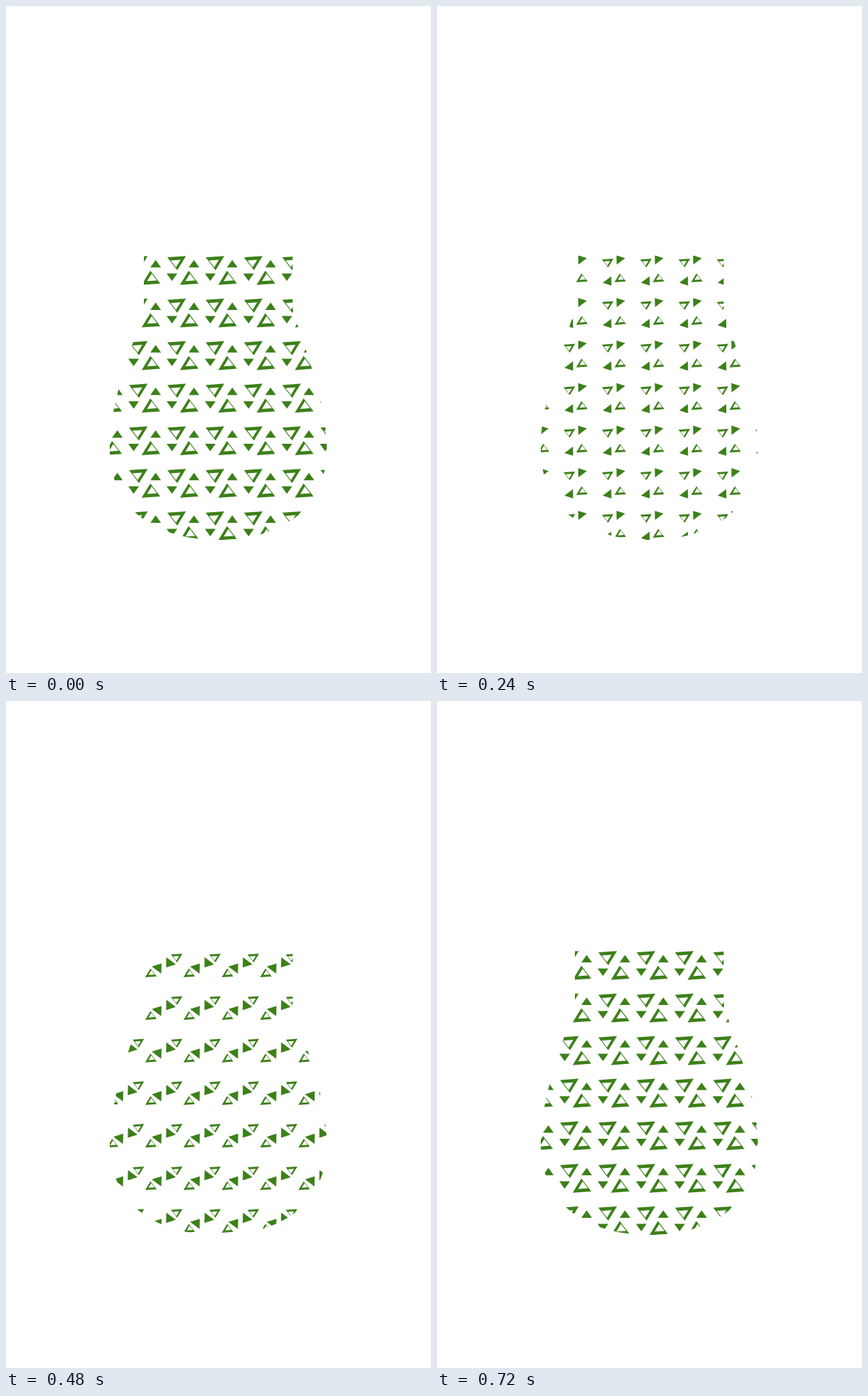
An HTML page with a canvas that plays this animation: 598 px wide and 937 px high, repeating every 750 ms.

```html
<!DOCTYPE html>
<html lang="en">
<head>
<meta charset="utf-8">
<title>Triangle pattern</title>
<style>
  html, body { margin: 0; width: 100%; height: 100%; overflow: hidden; background: #fff; }
  canvas { display: block; }
</style>
</head>
<body>
<canvas id="stage" width="598" height="937"></canvas>
<script>
const canvas = document.getElementById('stage');
const ctx = canvas.getContext('2d');
const LOOP = 750, STEP = 30, STEPS = 24;
const GREEN = '#3c8019';
const AXIS = 298.7;
const TILE = { x: 249, y: 371.5, w: 53.9, h: 59.8 };

// Straight neck, flared shoulder, round belly; the right half mirrors the left.
function vasePath() {
  const left = new Path2D();
  left.moveTo(AXIS, 350.5);
  left.lineTo(194, 350.5);
  left.lineTo(194, 425);
  left.bezierCurveTo(184, 465, 146, 550, 146, 620);
  left.bezierCurveTo(145, 710, 215, 750, AXIS, 750);
  left.closePath();
  const whole = new Path2D(left);
  whole.addPath(left, new DOMMatrix([-1, 0, 0, 1, 2 * AXIS, 0]));
  return whole;
}

function polygon(points) {
  const path = new Path2D();
  points.forEach(([x, y]) => path.lineTo(x, y));
  path.closePath();
  return path;
}

// Shapes relative to the tile centre; the hole is a shrunken copy of the outline.
const solid = polygon([[15.5, -14.8], [8, -4.3], [23, -4.3]]);
const outline = polygon([[-22, -18.5], [4.2, -20.3], [-8, -0.3]]);
const hollow = new Path2D(outline);
hollow.addPath(outline, new DOMMatrix([0.53, 0, 0, 0.53, -5.6, -4.3]));
const pivot = { x: -8.7, y: -10.5 };
const vase = vasePath();

const easeInOut = p => p < 0.5
  ? Math.pow(2 * p, 2.2) / 2
  : 1 - Math.pow(2 - 2 * p, 2.2) / 2;

// Swells the orbiting triangles during the later part of their turn.
const swell = p => 1 + 0.12 * Math.sin(Math.PI * Math.max(0, (p - 0.4) / 0.6)) ** 2;

function drawHalf(turn, grow, shrink) {
  ctx.save();
  ctx.rotate(-turn);
  ctx.scale(grow, grow);
  ctx.fill(solid);
  ctx.restore();

  ctx.save();
  ctx.translate(pivot.x, pivot.y);
  ctx.scale(shrink, shrink);
  ctx.translate(-pivot.x, -pivot.y);
  ctx.fill(hollow, 'evenodd');
  ctx.restore();
}

function draw(p) {
  const turn = Math.PI * easeInOut(p);
  const grow = swell(p);
  const shrink = 0.43 + 0.57 * Math.abs(1 - 2 * p);

  ctx.fillStyle = '#fff';
  ctx.fillRect(0, 0, canvas.width, canvas.height);
  ctx.save();
  ctx.clip(vase);
  ctx.fillStyle = GREEN;
  for (let row = -1; row < 8; row++) {
    for (let col = -3; col < 5; col++) {
      ctx.save();
      ctx.translate(TILE.x + col * TILE.w, TILE.y + row * TILE.h);
      drawHalf(turn, grow, shrink);
      ctx.rotate(Math.PI);
      drawHalf(turn, grow, shrink);
      ctx.restore();
    }
  }
  ctx.restore();
}

function tick() {
  const step = Math.floor((performance.now() % LOOP) / STEP);
  draw(Math.min(step / STEPS, 1));
  requestAnimationFrame(tick);
}
tick();
</script>
</body>
</html>
```
